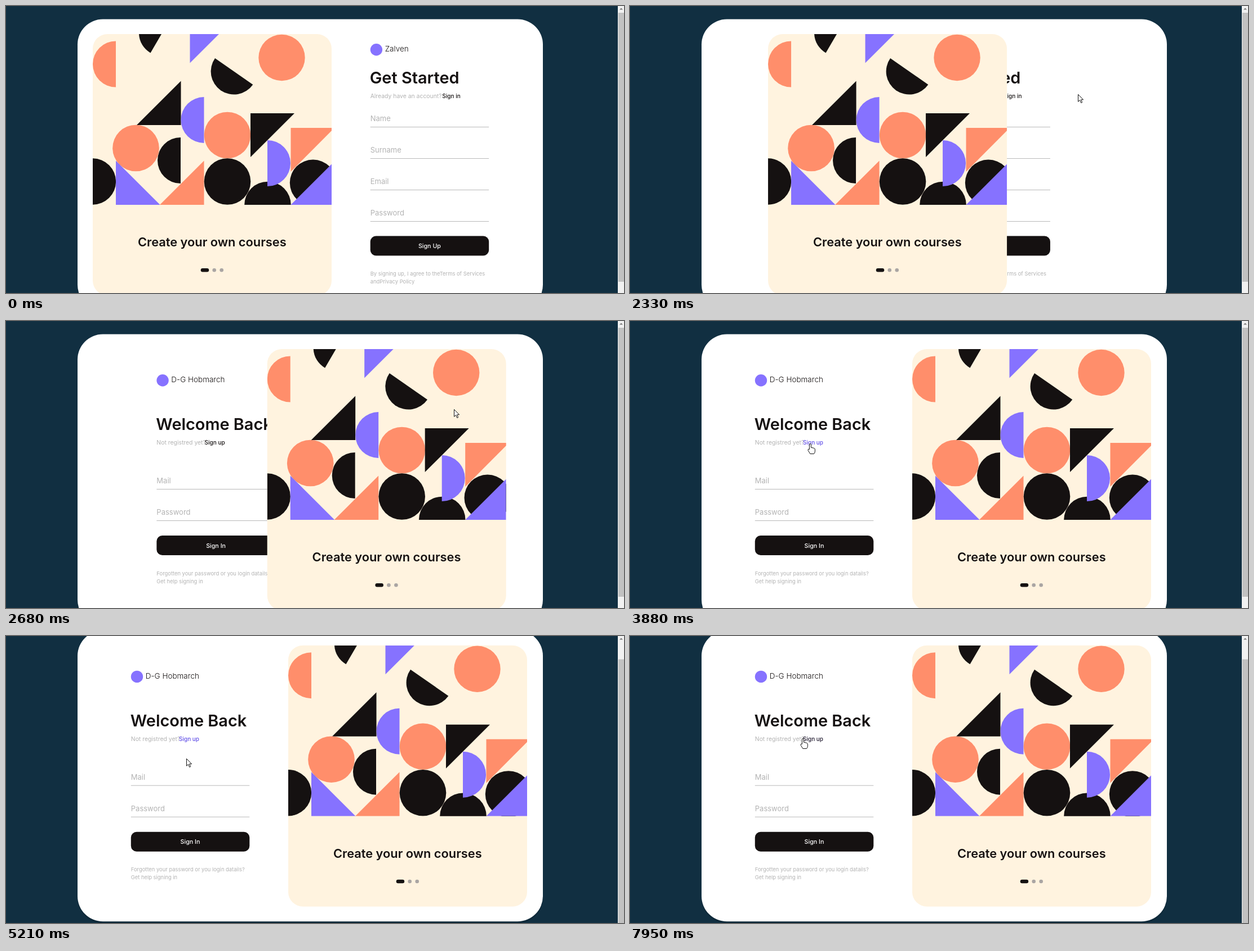
Recreate the animation shown at these times as an HTML page. Size 1097 by 511 pixels, loop 8000 ms.

```html
<!DOCTYPE html>
<html lang="en">
<head>
<meta charset="utf-8">
<title>Sign up and sign in</title>
<style>
  html, body { margin: 0; height: 100%; overflow: hidden; background: #112f41; }
  svg.stage { display: block; width: 100vw; height: 100vh; }
  text { font-family: Inter, "Open Sans", sans-serif; fill: #151111; }
  .brand { font-size: 13.5px; font-weight: 300; }
  .heading { font-size: 28.9px; font-weight: 600; }
  .small { font-size: 10.4px; fill: #b3b3b3; }
  .link { font-size: 10px; font-weight: 500; }
  .field { font-size: 13px; fill: #b3b3b3; }
  .button { font-size: 10.7px; font-weight: 500; fill: #fff; text-anchor: middle; }
  .note { font-size: 9.4px; fill: #b3b3b3; }
  .title { font-size: 21.8px; font-weight: 600; text-anchor: middle; }
  .k { fill: #151111; }
  .o { fill: #ff8e6b; }
  .p { fill: #8672ff; }
  .pointer { fill: #fff; stroke: #111; stroke-width: 1; stroke-linejoin: round; }
</style>
</head>
<body>
<svg class="stage" viewBox="0 0 1097 511">
  <rect width="1097" height="511" fill="#112f41"/>
  <g id="page">
    <rect x="127" y="28" width="826" height="517" rx="45" fill="#0c2433" opacity=".5"/>
    <rect x="127" y="23.5" width="826" height="518" rx="45" fill="#fff"/>
    <g id="signUp"></g>
    <g id="signIn"></g>
    <g id="panel">
      <rect x="154" y="50" width="424" height="465" rx="26" fill="#fff3df"/>
      <svg x="154" y="50" width="424" height="304" viewBox="154 50 424 304">
        <path class="o" d="M195 62.5a41 41 0 0 0 0 82z"/>
        <path class="k" d="M236 50A41 41 0 0 0 256.5 83.5L276 50z"/>
        <path class="p" d="M326.5 50H378L326.5 101.5z"/>
        <circle class="o" cx="489.5" cy="92" r="41.2"/>
        <path class="k" d="M371 93A41 41 0 0 0 438.3 140z"/>
        <path class="k" d="M310.5 133.5V212H232z"/>
        <path class="p" d="M351.5 162a41 41 0 0 0 0 82z"/>
        <circle class="o" cx="393" cy="230" r="41.3"/>
        <path class="k" d="M434 191h78l-78 78z"/>
        <path class="o" d="M505.5 217H583l-77.5 78z"/>
        <circle class="o" cx="230.5" cy="253" r="41.3"/>
        <path class="k" d="M310 234a41 41 0 0 0 0 82z"/>
        <path class="k" d="M154 271.3a41.2 41.2 0 0 1 0 82.4z"/>
        <path class="p" d="M195 275.5V354h78.5z"/>
        <path class="o" d="M351.5 275.5V354H273z"/>
        <circle class="k" cx="393" cy="312.5" r="41.3"/>
        <circle class="k" cx="464.5" cy="354" r="41.3"/>
        <path class="p" d="M464 239a41 41 0 0 1 0 82z"/>
        <circle class="k" cx="545" cy="314.7" r="41.2"/>
        <path class="p" d="M578 281.5V354H505.5z"/>
      </svg>
      <text class="title" x="365.8" y="428">Create your own courses</text>
      <rect class="k" x="345.7" y="467" width="14.5" height="6.6" rx="3.3"/>
      <circle cx="369.7" cy="470.3" r="3.3" fill="#aaa5a3"/>
      <circle cx="382.7" cy="470.3" r="3.3" fill="#aaa5a3"/>
    </g>
  </g>
  <rect x="1086" width="11" height="511" fill="#f1f1f1"/>
  <path d="M1089 6.5l3-3 3 3z" fill="#777"/>
  <rect id="thumb" x="1087" y="12" width="10" height="479" fill="#c1c1c1"/>
  <g id="tooltip">
    <rect x="293.5" y="265.5" width="121" height="19" fill="#fff" stroke="#8a8a8a"/>
    <text x="299" y="278.3" font-size="9.3">Please fill out this field.</text>
  </g>
  <circle id="ripple" cx="795" cy="157" fill="none" stroke="#8672ff"/>
  <g id="cursor">
    <path id="arrow" class="pointer" d="M.5.5v12.8l3-2.8 2.2 5 2-.9-2.1-4.8h4z"/>
    <path id="hand" class="pointer" d="M-1.6 10.5V2q0-1.5 1.5-1.5T1.4 2v5.2l5 1.1q2 .5 2 2.5v3q0 2.5-1.8 4.7H-.2L-3.8 12.5q-.8-1.9.6-2.3z"/>
    <path id="beam" fill="none" stroke="#222" d="M-3.5-8.5H-1L0-7.5 1-8.5H3.5M0-7.5v15M-3.5 8.5H-1L0 7.5 1 8.5H3.5"/>
  </g>
</svg>
<script>
const LOOP = 8000;
const $ = id => document.getElementById(id);
const clamp = v => Math.max(0, Math.min(1, v));
const ramp = (t, from, to) => clamp((t - from) / (to - from));
const within = (t, spans) => spans.some(([from, to]) => t >= from && t < to);
const show = (id, visible) => $(id).setAttribute('visibility', visible ? 'visible' : 'hidden');
const move = (id, x, y) => $(id).setAttribute('transform', `translate(${x} ${y})`);

// CSS ease-in-out: cubic-bezier(.42, 0, .58, 1)
function easeInOut(x) {
  let low = 0, high = 1;
  for (let i = 0; i < 20; i++) {
    const u = (low + high) / 2;
    const bx = 3 * (1 - u) ** 2 * u * .42 + 3 * (1 - u) * u * u * .58 + u ** 3;
    if (bx < x) low = u; else high = u;
  }
  return low * low * (3 - 2 * low);
}

const label = (cls, x, y, text, id = '') => `<text class="${cls}" x="${x}" y="${y}" id="${id}">${text}</text>`;

function buildForm(id, f) {
  const { x, logoY, buttonY } = f;
  const fields = f.fields.map((name, i) => {
    const y = f.fieldY + i * 56;
    return label('field', x, y, name) +
      `<path d="M${x} ${y + 10.5}h210.5" stroke="#b9b9b9"/>`;
  });
  $(id).innerHTML =
    `<circle class="p" cx="${x + 10.7}" cy="${logoY}" r="10.7"/>` +
    label('brand', x + 26, logoY + 3.3, f.brand) +
    label('heading', x - 1, f.headingY, f.heading) +
    label('small', x, f.headingY + 26, f.question) +
    label('link', f.linkX, f.headingY + 26, f.link, id + 'Link') +
    fields.join('') +
    `<rect class="k" x="${x}" y="${buttonY}" width="210.5" height="35" rx="10"/>` +
    label('button', x + 105.2, buttonY + 21.5, f.button) +
    f.notes.map((line, i) => label('note', x, buttonY + 70.7 + i * 13.8, line)).join('');
}

buildForm('signUp', {
  x: 646.7, logoY: 77.7, brand: 'Zalven', headingY: 138, heading: 'Get Started',
  question: 'Already have an account?', linkX: 774.3, link: 'Sign in',
  fieldY: 205, fields: ['Name', 'Surname', 'Email', 'Password'],
  buttonY: 409.5, button: 'Sign Up',
  notes: ['By signing up, I agree to theTerms of Services', 'andPrivacy Policy']
});
buildForm('signIn', {
  x: 221.8, logoY: 105.7, brand: 'D-G Hobmarch', headingY: 194, heading: 'Welcome Back',
  question: 'Not registred yet?', linkX: 307, link: 'Sign up',
  fieldY: 289, fields: ['Mail', 'Password'],
  buttonY: 382, button: 'Sign In',
  notes: ['Forgotten your password or you login datails?', 'Get help signing in']
});

// time, x, y of the pointer tip
const path = [
  [300, 1013, 486], [580, 783, 172], [840, 783, 172], [1170, 795, 157],
  [2820, 795, 157], [3600, 326, 214], [3880, 320, 218], [5210, 320, 218],
  [5770, 338, 174], [5970, 338, 174], [6680, 288, 256], [7600, 288, 256],
  [7880, 310, 178], [7950, 307, 182]
];
function pointerAt(t) {
  const next = path.findIndex(point => point[0] > t);
  if (next === 0) return path[0].slice(1);
  if (next < 0) return path[path.length - 1].slice(1);
  const [t0, x0, y0] = path[next - 1], [t1, x1, y1] = path[next];
  const k = easeInOut(ramp(t, t0, t1));
  return [x0 + (x1 - x0) * k, y0 + (y1 - y0) * k];
}

const handTimes = [[980, 1990], [3670, 5210], [5560, 6050], [7820, LOOP]];
const beamTimes = [[6500, 7660]];

function tint(id, hover) {
  const mix = (a, b) => Math.round(a + (b - a) * hover);
  $(id).style.fill = `rgb(${mix(21, 98)},${mix(17, 80)},${mix(17, 232)})`;
}

function draw(t) {
  const slide = easeInOut(ramp(t, 2033, 2873));
  move('panel', 347 * slide, 0);
  move('signUp', -424 * slide, 0);
  move('signIn', 424 * (1 - slide), 0);
  show('signUp', slide < .5);
  show('signIn', slide >= .5);

  const scroll = ramp(t, 4680, 4880);
  move('page', 0, -33.3 * scroll);
  move('thumb', 0, 29.5 * scroll);

  tint('signUpLink', ramp(t, 960, 1170) - ramp(t, 2070, 2320));
  tint('signInLink', ramp(t, 3650, 3880) - ramp(t, 5210, 5450) +
    ramp(t, 5540, 5770) - ramp(t, 6000, 6250) + ramp(t, 7910, 8200));

  const pulse = ramp(t, 1330, 1660);
  show('ripple', pulse > 0 && pulse < 1);
  $('ripple').setAttribute('r', 3 + 7 * pulse);
  $('ripple').setAttribute('opacity', .5 * (1 - pulse));

  show('tooltip', within(t, [[7400, 7600]]));
  const visible = t >= 300, hand = within(t, handTimes), beam = within(t, beamTimes);
  show('hand', visible && hand);
  show('beam', visible && beam);
  show('arrow', visible && !hand && !beam);
  move('cursor', ...pointerAt(t));
}

function tick() {
  draw(performance.now() % LOOP);
  requestAnimationFrame(tick);
}
tick();
</script>
</body>
</html>
```
